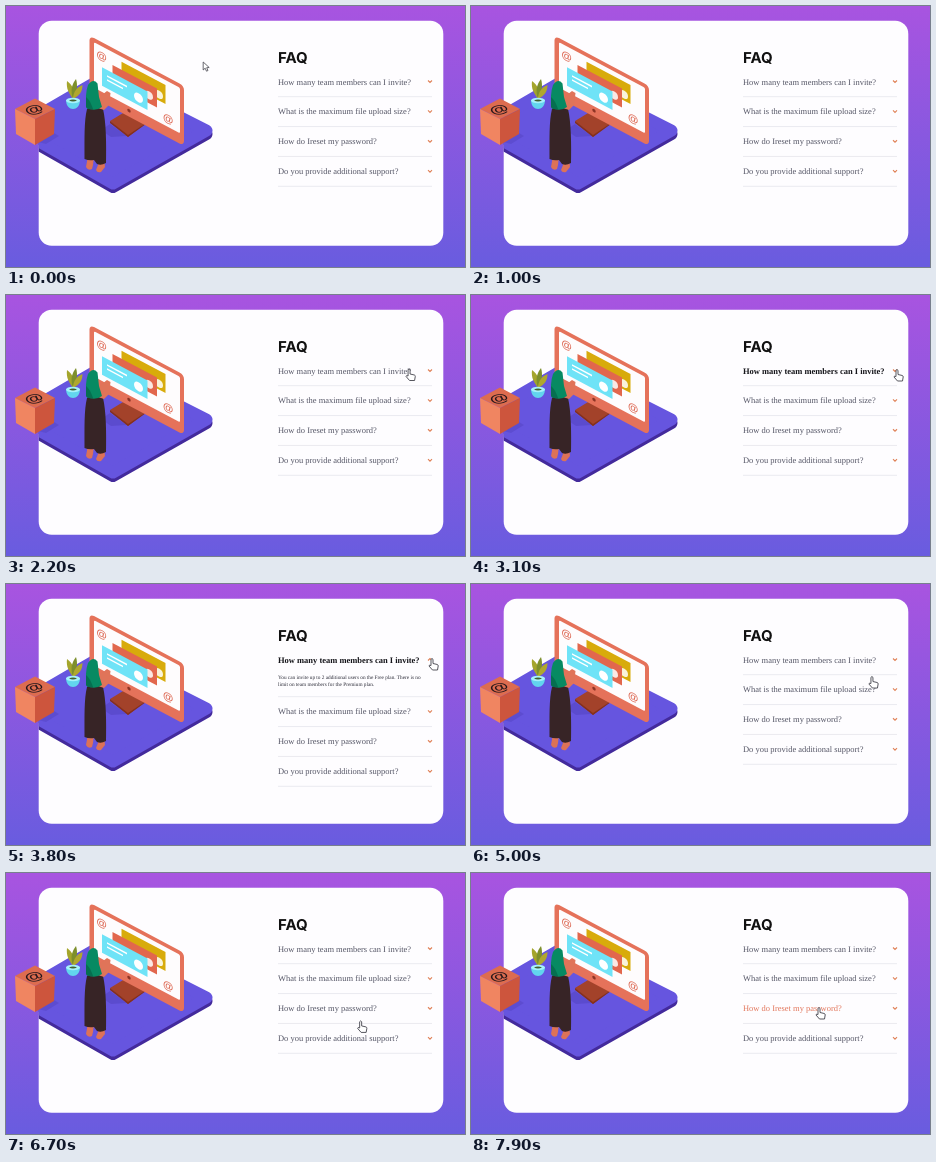
An HTML page that plays this animation: 459x261 px, repeating every 8 s.

```html
<!DOCTYPE html>
<html lang="en">
<head>
<meta charset="utf-8">
<title>FAQ accordion</title>
<style>
  html, body { margin: 0; width: 100%; height: 100%; overflow: hidden; background: #8a58e0; }
  svg { display: block; width: 459px; height: 261px; }
  text { text-rendering: geometricPrecision; }
  #list text { font: 8.480px "Liberation Serif", "Times New Roman", serif; fill: #555666; }
  #list #answer text { font-size: 5.280px; fill: #2c2c38; }
  #list .hover { fill: #e2775c; }
  #list .open { font-weight: 700; fill: #15151a; }
  .at { font: 700 10.500px "Liberation Sans", Arial, sans-serif; text-anchor: middle; }
</style>
</head>
<body>
<svg viewBox="0 0 459 261">
  <defs>
    <linearGradient id="sky" x1="0" y1="0" x2="0" y2="1">
      <stop stop-color="#a854e0"/><stop offset="1" stop-color="#695cdf"/>
    </linearGradient>
    <rect id="card" x="32.700" y="14.700" width="404.600" height="225" rx="13"/>
    <clipPath id="inside"><use href="#card"/></clipPath>
  </defs>
  <rect width="459" height="261" fill="url(#sky)"/>
  <use href="#card" fill="#fefdff"/>

  <!-- platform -->
  <g clip-path="url(#inside)" stroke-linejoin="round" stroke-width="12">
    <path d="M97 75.500L200.500 128 107 181 10 126z" fill="#432a9c" stroke="#432a9c"/>
    <path d="M97 72L200.500 124.500 107 177.500 10 122.500z" fill="#6655df" stroke="#6655df"/>
    <path d="M48 127l5 3-13 8-8-2z" fill="#4c3cb4" opacity=".35"/>
    <path d="M104 118l-9 6 10 7 16-1z" fill="#4c3cb4" opacity=".4"/>
  </g>

  <!-- cube -->
  <path d="M29 92.500l20 10.500-20 10L9 103z" fill="#dd6c4f"/>
  <path d="M9 103l20 10v26L10 128z" fill="#f08561"/>
  <path d="M49 103l-20 10v26l19-11z" fill="#cd553d"/>
  <text class="at" transform="matrix(1.700 -.450 .900 .880 28 103.500)" y="3.300" fill="#25171b">@</text>

  <!-- plant -->
  <path d="M67 93C63 87 60 83 61 75c6 4 8 11 6.500 18z" fill="#a4a52c"/>
  <path d="M67 93C64 84 66 78 70 73c2 7 1 14-3 20z" fill="#7d8f2c"/>
  <path d="M67 93c0-7 4-12 9.500-14 0 7-3.500 11-9.500 14z" fill="#b0a72e"/>
  <path d="M60 94c0 12 14 12 14 0z" fill="#62d5ee"/>
  <ellipse cx="67" cy="94.500" rx="7" ry="2.800" fill="#a6f1fb"/>
  <path d="M63 94.500q4-2 8 0-4 2-8 0z" fill="#42602d"/>

  <!-- monitor -->
  <path d="M104 115l18-11 18 13-18 14z" fill="#a3422a"/>
  <path d="M104 115l18 14 18-12v1l-18 13-18-14z" fill="#85301c"/>
  <g transform="matrix(1 .53 0 1 84 30)">
    <rect x="-.5" width="94.500" height="60" rx="4.500" fill="#e5725a"/>
    <rect x="4" y="4" width="86" height="45.500" rx="1.500" fill="#fefcfd"/>
    <circle cx="39" cy="54" r="1.700" fill="#8d3425"/>
    <rect x="31.500" y="9" width="44" height="19" fill="#d8ab0b"/>
    <circle cx="69" cy="22" r="4" fill="#fff" opacity=".85"/>
    <rect x="22.500" y="17" width="44.500" height="19" fill="#e2674d"/>
    <circle cx="59" cy="28" r="4" fill="#fff" opacity=".85"/>
    <rect x="12" y="25" width="45.500" height="18.500" fill="#6fe3f7"/>
    <path d="M17 31h20M17 35h16" stroke="#fff" stroke-width="1.600"/>
    <circle cx="48.500" cy="36" r="4.500" fill="#fff"/>
    <text class="at" x="11.500" y="17.300" fill="#dd6853">@</text>
    <text class="at" x="78" y="44.800" fill="#dd6853">@</text>
  </g>

  <!-- woman -->
  <path d="M82 150h6l-1 9-1 4q-4 2-6-2zM91 152h7l1 9-4 5q-4 1-5-2l2-5z" fill="#dd7257"/>
  <path d="M81 103q8-3 16 0c3 12 3.500 34 3 54q-5 3-9 1l-3-4q-5 1-9.500-1c0-20-.5-38 2.500-50z" fill="#372426"/>
  <path d="M92 92l9-7 3.500 2-1.500 12-5 5-6-2z" fill="#e07459"/>
  <path d="M82 79q5-7 9.500-1.500l1.500 13.500 3 10q-7 5-15 1-2.500-13 1-23z" fill="#078a62"/>
  <path d="M80 91q4 3 7 12-6 1-7-2z" fill="#066f50"/>

  <text x="272" y="57.400" font-family="Inter, sans-serif" font-weight="700" font-size="15" fill="#111">FAQ</text>
  <g id="list">
    <g id="answer">
      <text x="272" y="95">You can invite up to 2 additional users on the Free plan. There is no</text>
      <text x="272" y="102">limit on team members for the Premium plan.</text>
    </g>
  </g>

  <g stroke="#45454d" fill="#fff" stroke-linejoin="round">
    <path id="arrow" stroke-width=".8" d="M0 0v8l2-1.800 1.300 3 1.500-.7L3.500 5.700 6 5.500z"/>
    <path id="hand" stroke-width=".9" d="M-1 .8q1-1.600 2 0V5l4.300 1q1 .3.900 1.500L5.500 11.500H.500L-3 7.500q0-1.500 2-.5z"/>
  </g>
</svg>
<script>
const $ = id => document.getElementById(id);
const LOOP = 8000, PITCH = 29.87, GROW = 22;
const questions = [
  'How many team members can I invite?',
  'What is the maximum file upload size?',
  'How do Ireset my password?',
  'Do you provide additional support?'
];

// Cursor tip: time, x, y
const path = [
  [0, 197, 56], [500, 290, 52], [900, 438, 58], [1000, 475, 62],
  [1400, 475, 110], [1800, 440, 92], [2200, 403, 74], [2500, 426, 74.5],
  [4900, 426, 74.5], [5000, 401, 92.5], [5400, 376, 106], [5800, 362, 135.5],
  [6150, 358, 163], [6500, 358, 164], [6800, 353, 140], [7200, 348, 134.5], [LOOP, 348, 134.5]
];

const make = (tag, attrs, parent) => {
  const el = document.createElementNS('http://www.w3.org/2000/svg', tag);
  for (const key in attrs) el.setAttribute(key, attrs[key]);
  return parent.appendChild(el);
};

const items = questions.map((question, i) => {
  const row = make('g', {}, $('list'));
  const label = make('text', { x: 272, y: 78.6 }, row);
  label.textContent = question;
  const chevron = make('path', { d: 'M-2-1L0 1 2-1', fill: 'none', stroke: '#e08258', 'stroke-width': 1.1 }, row);
  const line = make('path', { d: 'M272 90.700h154', stroke: '#e6e6ec', 'stroke-width': .8 }, row);
  return { row, label, chevron, line, y: i * PITCH };
});

const ease = (t, start, length) => {
  const p = Math.min(1, Math.max(0, (t - start) / length));
  return p * p * (3 - 2 * p);
};

function cursorAt(t) {
  const i = path.findIndex(point => point[0] > t);
  const [t0, x0, y0] = path[i - 1], [t1, x1, y1] = path[i];
  const p = (t - t0) / (t1 - t0);
  return [x0 + (x1 - x0) * p, y0 + (y1 - y0) * p];
}

function draw(t) {
  const open = ease(t, 3100, 400) - ease(t, 4050, 450);
  const [x, y] = cursorAt(t);
  const overList = x >= 272 && x <= 428 && y > 66;

  items.forEach((item, i) => {
    const shift = open * GROW;
    item.row.setAttribute('transform', `translate(0 ${item.y + (i ? shift : 0)})`);
    item.line.setAttribute('transform', `translate(0 ${i ? 0 : shift})`);
    item.chevron.setAttribute('transform', `translate(424 75.500) rotate(${i ? 0 : 180 * open})`);
    const hovered = i > 0 && overList && Math.abs(y - 76 - item.y) < 9;
    item.label.setAttribute('class', !i && open > 0 ? 'open' : hovered ? 'hover' : '');
  });
  $('answer').setAttribute('opacity', Math.max(0, open * 2 - 1));

  $('arrow').setAttribute('visibility', overList ? 'hidden' : 'visible');
  $('hand').setAttribute('visibility', overList ? 'visible' : 'hidden');
  for (const id of ['arrow', 'hand']) $(id).setAttribute('transform', `translate(${x} ${y})`);
}

function tick() {
  draw(performance.now() % LOOP);
  requestAnimationFrame(tick);
}
tick();
</script>
</body>
</html>
```
